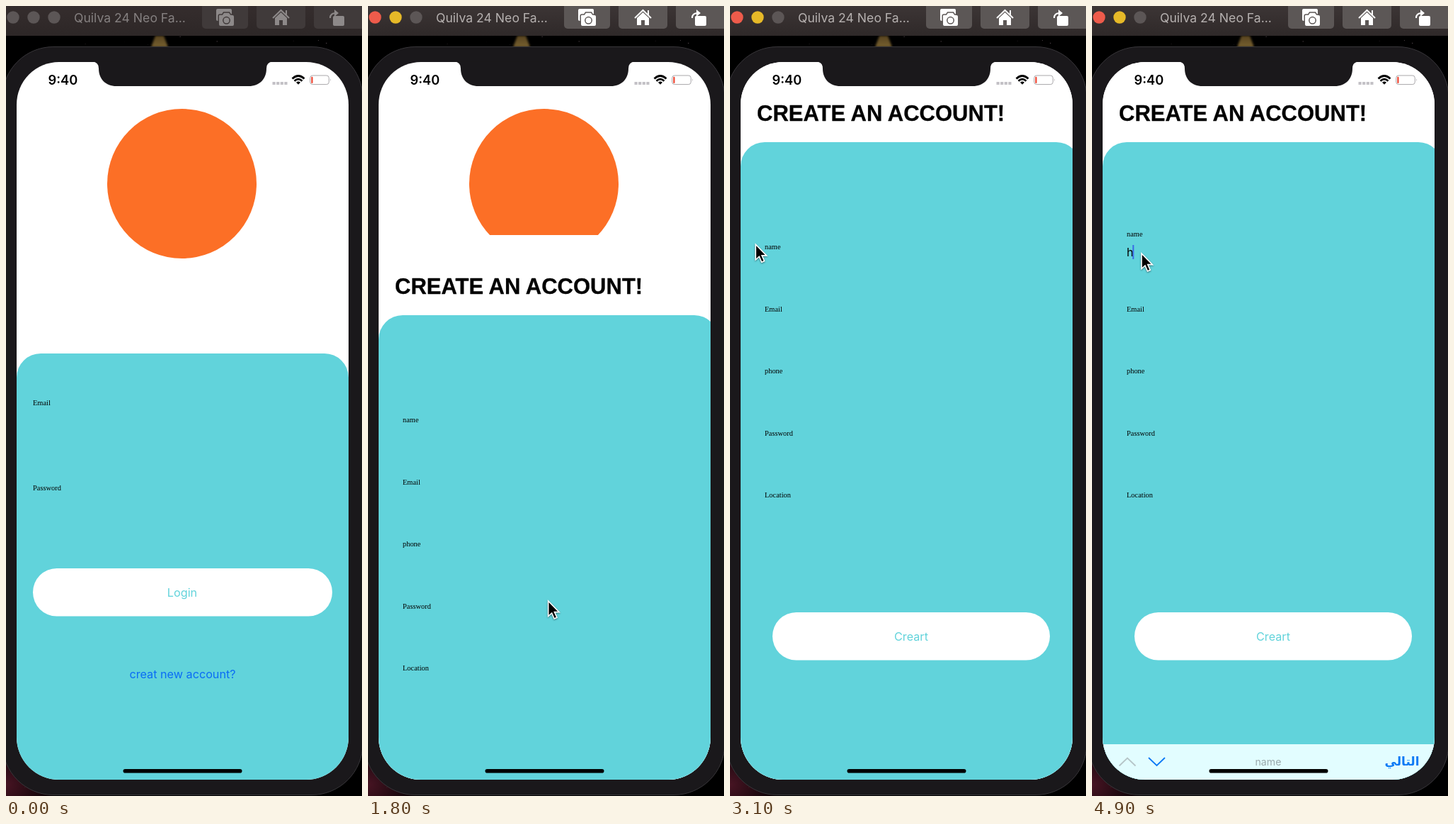
An HTML page for the animation above (5000 ms loop, 503 by 1114 pixels).

```html
<!DOCTYPE html>
<html lang="en">
<head>
<meta charset="utf-8">
<title>Sign-up screen demo</title>
<style>
  html, body { margin: 0; width: 100%; height: 100%; overflow: hidden; background: #000; }
  svg { display: block; width: 100%; height: 100%; }
  text { font-family: Inter, sans-serif; font-size: 16.2px; }
  .label { font-family: "Liberation Serif", serif; font-size: 10.4px; }
  .middle { text-anchor: middle; }
  .teal { fill: #61d3db; }
  .heading {
    font: bold 31px "Liberation Sans", sans-serif;
    stroke: #000; stroke-width: .3; stroke-linejoin: round;
  }
  #window { --bar1: #352d2d; --bar2: #2d2727; --button: #403a3a; --icon: #8d8989; --title: #858080; }
  #window.active { --bar1: #3c3535; --bar2: #2f2929; --button: #5c5756; --icon: #fff; --title: #b6b1b0; }
  .button { fill: var(--button); }
  .icon { fill: var(--icon); }
  .iconLine { fill: none; stroke: var(--icon); stroke-width: 2; }
  .cut { fill: none; stroke: var(--button); stroke-width: 1.5; }
  .dot { fill: #5c5656; }
  .active .close { fill: #ee5b4b; }
  .active .minimize { fill: #e6b928; }
</style>
</head>
<body>
<svg viewBox="0 0 503 1114" preserveAspectRatio="none">
  <defs>
    <clipPath id="screen"><rect x="15" y="79" width="469" height="1012" rx="60"/></clipPath>
    <radialGradient id="nebula">
      <stop stop-color="#471423"/><stop offset="1" stop-color="#471423" stop-opacity="0"/>
    </radialGradient>
    <linearGradient id="glow" x2="0" y2="1">
      <stop stop-color="#57431f"/><stop offset="1" stop-color="#77602f"/>
    </linearGradient>
  </defs>

  <!-- Desktop -->
  <rect width="503" height="1114"/>
  <g id="stars" fill="#564950"></g>
  <ellipse cx="0" cy="1098" rx="75" ry="65" fill="url(#nebula)"/>
  <path d="M211 42h12l6 16h-24z" fill="url(#glow)" style="filter:blur(1.5px)"/>

  <!-- Simulator window bar -->
  <g id="window">
    <linearGradient id="bar" x2="0" y2="1">
      <stop style="stop-color:var(--bar1)"/><stop offset="1" style="stop-color:var(--bar2)"/>
    </linearGradient>
    <rect width="503" height="42" fill="url(#bar)"/>
    <circle class="dot close" cx="10" cy="16" r="8.7"/>
    <circle class="dot minimize" cx="39" cy="16" r="8.7"/>
    <circle class="dot" cx="68" cy="16" r="8.7"/>
    <text x="96" y="23" style="font-size:17.6px;fill:var(--title)">Quilva 24 Neo Fa...</text>
    <g class="button">
      <rect x="277" y="-8" width="65" height="40" rx="5"/>
      <rect x="354" y="-8" width="69" height="40" rx="5"/>
      <rect x="435" y="-8" width="80" height="40" rx="5"/>
    </g>
    <path class="icon" d="M297 6q0-2 2-2h18q2 0 2 2v15h-20q-2 0-2-2z"/>
    <path class="icon" d="M301 15q0-2 2-2h3l2-3h7l2 3h3q2 0 2 2v11q0 2-2 2h-17q-2 0-2-2z"/>
    <path class="cut" d="M300.2 24V14q0-2 2-2h3.3l2-3h8l2 3h3"/>
    <circle class="cut" cx="311.5" cy="20.3" r="4.7"/>
    <path class="icon" d="M380 17l8.5-8 8.5 8v10h-6v-7h-5v7h-6z"/>
    <path class="iconLine" d="M377 17l11.5-11 11.5 11M396 6v7"/>
    <rect class="icon" x="462" y="14" width="16" height="14" rx="2"/>
    <path class="iconLine" d="M458 17q0-7 8-7"/>
    <path class="icon" d="M464 5l6 5-6 5z"/>
  </g>

  <!-- Phone -->
  <rect x="-5" y="57.5" width="509" height="1055" rx="72" fill="#1a181b" stroke="#38363a"/>
  <g clip-path="url(#screen)">
    <rect x="15" y="79" width="469" height="1012" fill="#fff"/>
    <circle cx="248.5" cy="250.5" r="105.5" fill="#fc6f26"/>
    <rect class="teal" x="15" y="490" width="469" height="660" rx="34"/>
    <text class="label" x="38" y="562.5">Email</text>
    <text class="label" x="38" y="683">Password</text>
    <rect x="38" y="793" width="423" height="67.5" rx="33.7" fill="#fff"/>
    <text class="teal middle" x="249" y="832.5">Login</text>
    <text class="middle" x="249.5" y="948" fill="#0a6cf5">creat new account?</text>

    <g id="signup">
      <rect x="15" y="79" width="469" height="1012" fill="#fff"/>
      <text class="heading" x="38" y="162">CREATE AN ACCOUNT!</text>
      <rect class="teal" x="15" y="192" width="480" height="960" rx="34"/>
      <g id="fields"></g>
      <rect x="60" y="855" width="392" height="67.5" rx="33.7" fill="#fff"/>
      <text class="teal middle" x="256" y="894.5">Creart</text>
      <text id="typed" x="49" y="353">h</text>
      <rect id="caret" y="337" width="2" height="20" fill="#3a6be6"/>
    </g>

    <g id="toolbar">
      <rect x="15" y="1041" width="469" height="51" fill="#e2fdff"/>
      <g fill="none" stroke-width="1.8">
        <path d="M38.5 1071.5l11.5-11 11.5 11" stroke="#b6c5c8"/>
        <path d="M80 1060l11.5 11 11.5-11" stroke="#0a79f5"/>
      </g>
      <text class="middle" x="249" y="1071" style="font-size:14.2px" fill="#9aa9ac">name</text>
      <text class="middle" x="438" y="1071" style="font:bold 17px 'DejaVu Sans',sans-serif" fill="#0a79f5">التالي</text>
    </g>
  </g>

  <!-- Notch, status items and home bar -->
  <path d="M122 78.5Q131 79 131 88C131 103 141 113 156 113H343C358 113 368 103 368 88Q368 79 377 78.5Z" fill="#1a181b"/>
  <text x="59.5" y="111" style="font-size:18.3px;font-weight:600">9:40</text>
  <path d="M376.5 109h21" stroke="#c3c1c6" stroke-width="4" stroke-dasharray="4.2 1.4"/>
  <g fill="none" stroke="#000" stroke-width="2.7">
    <path d="M404.5 102.5q8.5-8 17 0M407.5 105.7q5.5-5 11 0"/>
    <path d="M410 107.7q3-2.4 6 0l-3 3z" fill="#000" stroke="none"/>
  </g>
  <rect x="429.7" y="98" width="26.6" height="12.6" rx="3.5" fill="none" stroke="#a9a7aa"/>
  <rect x="431.3" y="99.7" width="2.2" height="9.2" rx="1" fill="#f0422e"/>
  <path d="M458 102.3q1.8 2 0 4z" fill="#a9a7aa"/>
  <rect x="165.5" y="1076" width="168" height="5.6" rx="2.8"/>

  <path id="pointer" d="M0 0V21.5L5 17 8.5 25 12.3 23.3 8.8 15.6H15.4Z" stroke="#fff" stroke-width="1.6"
    style="filter:drop-shadow(0 1px 1px #0007)"/>
</svg>
<script>
const LOOP = 5000, STEP = 100;
const FOCUS = 1500, PRESENT = 1649.9, TAP = 4000, TYPE = 4700;
const pointerPath = [
  [1100, 503, 1000], [1500, 255, 930], [1700, 255, 929], [2000, 254, 659],
  [2400, 31, 335], [3000, 31, 335], [3800, 73, 345], [4900, 70, 349]
];
const $ = id => document.getElementById(id);

$("fields").innerHTML = ["name", "Email", "phone", "Password", "Location"]
  .map((name, i) => `<text class="label" x="49" y="${343 + 87.5 * i}">${name}</text>`).join("");
const nameLabel = $("fields").firstChild;

let seed = 7;
const random = () => (seed = seed * 16807 % 2147483647) / 2147483647;
$("stars").innerHTML = Array.from({ length: 60 }, (_, i) =>
  `<circle cx="${random() * 503}" cy="${i % 2 ? 43 + random() * 50 : 1065 + random() * 48}" r="${random() * .7}"/>`).join("");

// Remaining distance of a critically damped spring, from 1 to 0.
function springLeft(ms) {
  const x = Math.max(0, ms) / 1000 * Math.sqrt(1000 / 3);
  return (1 + x) * Math.exp(-x);
}

function pointerAt(t) {
  const next = pointerPath.findIndex(p => p[0] > t);
  if (next < 1) return pointerPath[next < 0 ? pointerPath.length - 1 : 0].slice(1);
  const [t0, x0, y0] = pointerPath[next - 1], [t1, x1, y1] = pointerPath[next];
  const k = (t - t0) / (t1 - t0);
  return [x0 + (x1 - x0) * k, y0 + (y1 - y0) * k];
}

const moveTo = (id, x, y) => $(id).setAttribute("transform", `translate(${x} ${y})`);
const show = (id, visible) => $(id).setAttribute("visibility", visible ? "visible" : "hidden");

function draw(now) {
  const t = Math.floor(now % LOOP / STEP) * STEP;
  $("window").classList.toggle("active", t >= FOCUS);

  moveTo("signup", 0, Math.round(1012 * springLeft(t - PRESENT)));
  moveTo("toolbar", 0, 51 * springLeft(t - TAP));
  show("toolbar", t > TAP);

  const rise = Math.min(1, Math.max(0, (t - TAP) / 200));
  nameLabel.setAttribute("y", 343 - 18.5 * rise);

  show("typed", t >= TYPE);
  show("caret", t > TAP);
  $("caret").setAttribute("x", t >= TYPE ? 57.3 : 49);

  show("pointer", t >= pointerPath[0][0]);
  moveTo("pointer", ...pointerAt(t));
}

const start = performance.now();
(function tick() {
  draw(performance.now() - start);
  requestAnimationFrame(tick);
})();
</script>
</body>
</html>
```
